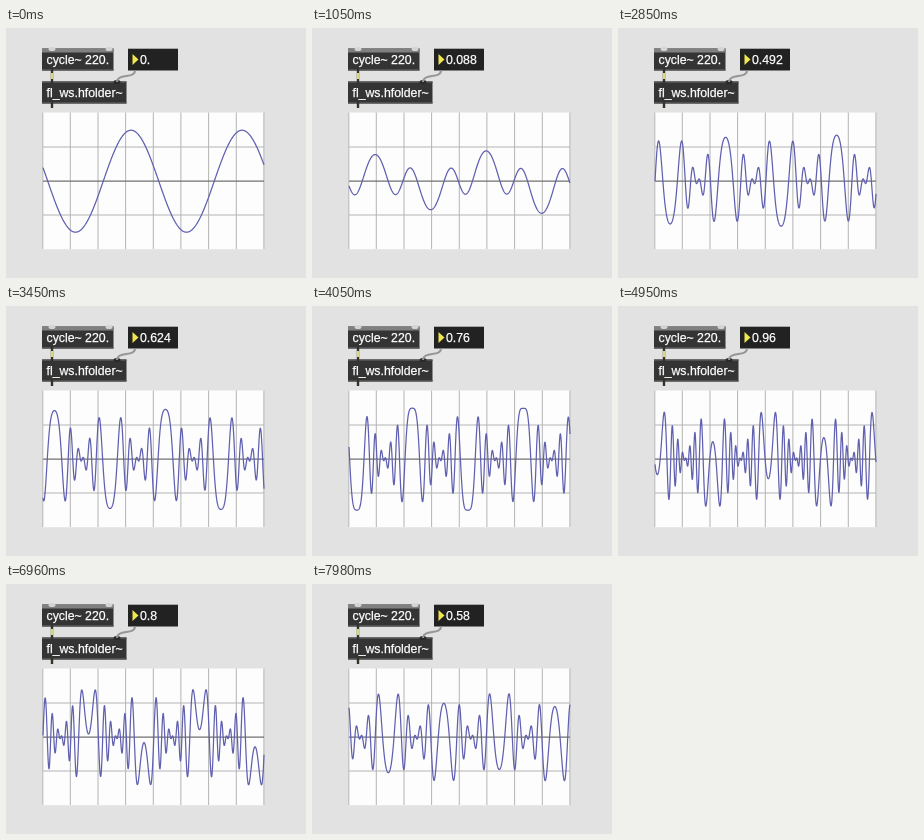
An HTML page that plays this animation: 300x250 px, repeating every 8 s.

```html
<!DOCTYPE html>
<html lang="en">
<head>
<meta charset="utf-8">
<title>Wavefolder patch</title>
<style>
html, body { margin: 0; width: 100%; height: 100%; overflow: hidden; background: #e2e2e2; }
svg { display: block; width: 300px; height: 250px; }
text { font: 12.3px "Liberation Sans", Arial, sans-serif; fill: #fff; stroke: #fff; stroke-width: 0.25; }
</style>
</head>
<body>
<svg viewBox="0 0 300 250">
  <rect width="300" height="250" fill="#e2e2e2"/>
  <g id="boxes"></g>

  <rect x="122" y="20.7" width="50" height="21.8" fill="#222"/>
  <path d="M126.5 26 L132.5 31.5 L126.5 37 Z" fill="#f0e650"/>
  <text id="value" x="134" y="35.6"></text>

  <path d="M129 42.5 C129 51 111 45 111 54" fill="none" stroke="#969696" stroke-width="2"/>
  <g id="cords" fill="none"></g>

  <rect x="36.5" y="84.5" width="221.5" height="136.7" fill="#fdfdfd"/>
  <path id="grid" fill="none" stroke="#b4b4b4"/>
  <path d="M37 153.2 H258" stroke="#707070" stroke-width="1.2"/>
  <path id="wave" fill="none" stroke="#6060b0" stroke-width="1.25" stroke-linejoin="round"/>
</svg>
<script>
const LOOP = 8000, STEP = 30;
const LEFT = 37, RIGHT = 258, MID = 153.2, AMP = 51, PERIOD = 111;
const SWEEP = 0.14; // ms of signal per pixel of scope
const $ = id => document.getElementById(id);

// [time, fold amount]; the scope trails the number box slightly
const numberKeys = [[659, 0], [5121, 1], [6033, 1], [7980, 0.58]];
const scopeKeys = [[659, 0], [1980, 0.294], [2850, 0.48], [4050, 0.752],
                   [5160, 1], [6075, 1], [6960, 0.808], [7980, 0.591]];

function lerpKeys(keys, t) {
  if (t <= keys[0][0]) return keys[0][1];
  for (let i = 1; i < keys.length; i++) {
    const [t0, v0] = keys[i - 1], [t1, v1] = keys[i];
    if (t <= t1) return v0 + (v1 - v0) * (t - t0) / (t1 - t0);
  }
  const [[t0, v0], [t1, v1]] = keys.slice(-2);
  return v1 + (v1 - v0) * (t - t1) / (t1 - t0);
}

function objectBox(label, y, width, bar) {
  return `<rect x="36" y="${y}" width="${width}" height="22" fill="#343434"/>
    <rect x="36" y="${y}" width="${width}" height="${bar.height}" fill="${bar.fill}"/>
    <rect x="36" y="${y + 20.5}" width="${width}" height="1.5" fill="#505050"/>
    <text x="40.5" y="${y + 15}">${label}</text>`;
}

const inlet = (x, y, fill) => `<ellipse cx="${x}" cy="${y}" rx="3.5" ry="2" fill="${fill}"/>`;

const cord = (y0, y1, color) => `<path d="M46 ${y0} V${y1}" stroke="${color}" stroke-width="2.4"/>`;

function gridPath() {
  let d = "M37 119 H258 M37 187 H258 M36.8 84.5 V221";
  for (let i = 1; i <= 8; i++) d += ` M${(LEFT - 0.3 + i * 27.65).toFixed(1)} 84.5 V221`;
  return d;
}

function wavePath(t) {
  const peak = 125 - 0.0061 * t;
  let d = "";
  for (let x = LEFT; x <= RIGHT; x += 0.25) {
    const amount = lerpKeys(scopeKeys, t + SWEEP * (x - (LEFT + RIGHT) / 2));
    const s = Math.cos((x - peak) / PERIOD * 2 * Math.PI);
    const y = MID - AMP * s * Math.cos(8 * Math.PI * amount * s);
    d += (d ? "L" : "M") + x + " " + y.toFixed(2);
  }
  return d;
}

function formatValue(v) {
  const n = Math.round(v * 250) / 250;
  return Number.isInteger(n) ? n + "." : String(+n.toFixed(3));
}

function draw(ms) {
  const t = Math.floor((ms % LOOP) / STEP) * STEP;
  $("value").textContent = formatValue(lerpKeys(numberKeys, t));
  $("wave").setAttribute("d", wavePath(t));
}

$("boxes").innerHTML =
  objectBox("cycle~ 220.", 20.5, 71.5, { height: 4, fill: "#808080" }) +
  objectBox("fl_ws.hfolder~", 53.5, 84.5, { height: 1.5, fill: "#505050" }) +
  inlet(46, 21, "#d4d4d4") + inlet(103, 21, "#d4d4d4") + inlet(111, 54, "#2a2a2a");
$("cords").innerHTML = cord(41, 55, "#333328") + cord(45, 51, "#d6d884") + cord(74, 80, "#333328");
$("grid").setAttribute("d", gridPath());

const start = performance.now();
function tick() {
  draw(performance.now() - start);
  requestAnimationFrame(tick);
}
tick();
</script>
</body>
</html>
```
